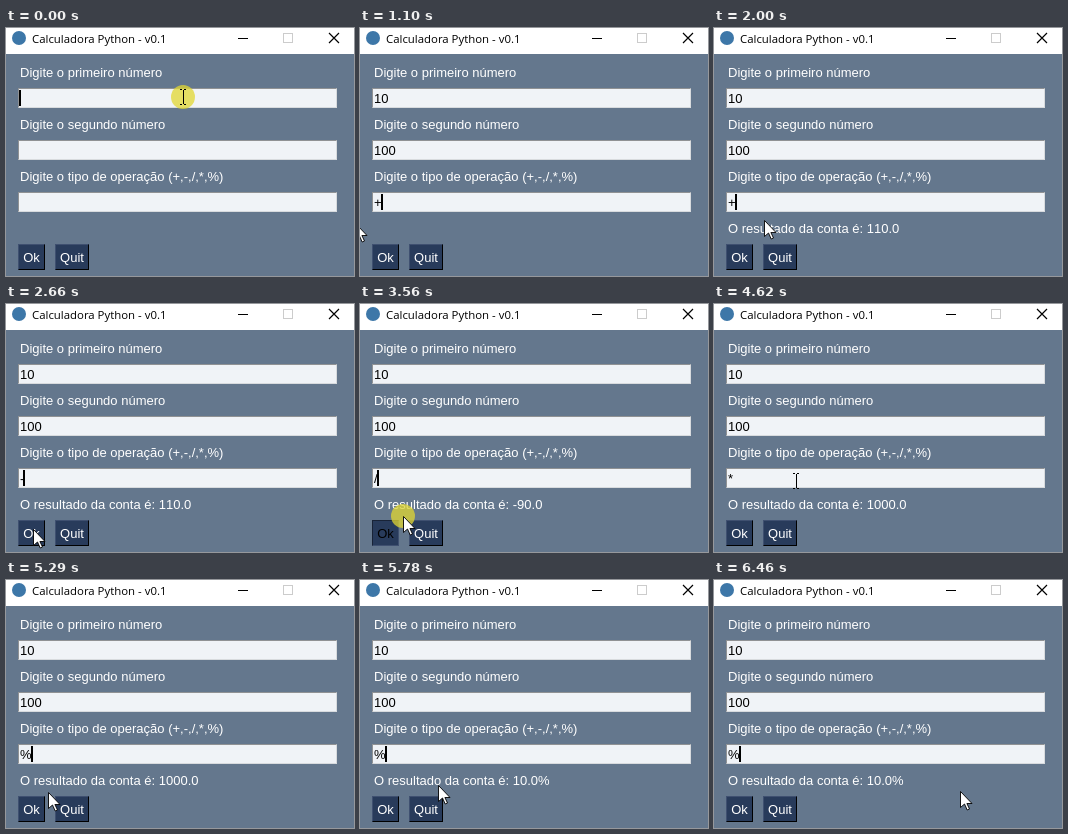
An HTML page for the animation above (6.48 s loop, 348 by 248 pixels).

```html
<!DOCTYPE html>
<html lang="pt">
<head>
<meta charset="utf-8">
<title>Calculadora Python</title>
<style>
  html, body { margin: 0; width: 100%; height: 100%; overflow: hidden; }
  body { position: relative; background: #64778d; }
  div, svg, .caret { position: absolute; box-sizing: border-box; }
  div { font: 13px/15px "Liberation Sans", Arial, sans-serif; font-kerning: none; white-space: pre; }
  .label { left: 14px; color: #fff; }
  .field {
    left: 12px; width: 319px; height: 20px; padding: 2px 1px; color: #000;
    background: #f0f3f7; border: 1px solid; border-color: #909294 #d8dbde #d8dbde #909294;
  }
  .caret { top: 1px; width: 2px; height: 16px; margin-left: -1px; background: #000; }
  .button {
    top: 216px; height: 26px; padding-top: 5px; text-align: center; color: #fff;
    background: #283b5b; border: 1px solid; border-color: #3f5070 #000 #000 #3f5070;
  }
  .button.down { color: #000; border-color: #182337 #3f5070 #3f5070 #182337; }
  svg { left: 0; top: 0; width: 348px; height: 248px; }
  svg text { font: 11.4px "Open Sans", "Noto Sans", sans-serif; }
  .crisp { shape-rendering: crispEdges; }
</style>
</head>
<body>
<div class="label" style="top:37px">Digite o primeiro número</div>
<div class="field" style="top:60px"><span></span><i class="caret"></i></div>
<div class="label" style="top:89px">Digite o segundo número</div>
<div class="field" style="top:112px"><span></span><i class="caret"></i></div>
<div class="label" style="top:141px">Digite o tipo de operação (+,-,/,*,%)</div>
<div class="field" style="top:164px"><span></span><i class="caret"></i></div>
<div class="label" id="result" style="top:193px"></div>
<div class="button" id="ok" style="left:12px; width:27px">Ok</div>
<div class="button" style="left:49px; width:34px">Quit</div>
<svg viewBox="0 0 348 248">
  <rect width="348" height="26" fill="#fff"/>
  <circle cx="13" cy="10" r="7" fill="#3d77a8"/>
  <text x="26" y="15">Calculadora Python - v0.1</text>
  <path class="crisp" d="M232 10.5h10" stroke="#000"/>
  <rect class="crisp" x="277.5" y="5.5" width="9" height="9" fill="none" stroke="#ccc"/>
  <path d="M323 5l10 10m0-10l-10 10" stroke="#000" stroke-width="1.2"/>
  <g id="pointer">
    <circle id="halo" r="12" fill="#e1d732" fill-opacity=".75"/>
    <path id="arrow" d="M.5 .5V16.5L4.5 13L7.2 19L9.5 18L6.9 12.5H12Z" fill="#fff" stroke="#000" stroke-width=".9"/>
    <path id="beam" class="crisp" d="M-3 -7.5h2m2 0h2M.5 -7V7M-3 7.5h2m2 0h2" fill="none" stroke="#000"/>
  </g>
</svg>
<script>
const LOOP = 6480, TICK = 20, PRESS = 100, KEY = 60;
const $ = id => document.getElementById(id);
const fields = [...document.querySelectorAll('.field')];
const a = 10, b = 100;

// Each operator: when it is typed, when Ok is pressed, and what it gives
const operations = [
  { sign: '+', typed: 700, ok: 1500, result: a + b },
  { sign: '-', typed: 2460, ok: 2860, result: a - b },
  { sign: '/', typed: 3360, ok: 3560, result: a / b },
  { sign: '*', typed: 3880, ok: 3940, result: a * b },
  { sign: '%', typed: 4820, ok: 5490, result: a * b / 100, unit: '%' }
];

// Where the pointer arrives, and when
const OK = [27, 225], FIELD = [62, 174];
const stops = [
  [0, 177, 69], [1100, -5, 195], [1400, ...OK], [2140, ...FIELD], [2660, ...OK],
  [3160, ...FIELD], [3460, 39, 219], [3700, ...FIELD], [3940, ...OK],
  [4620, 82, 177], [5390, ...OK], [5780, 78, 205], [6460, 246, 211]
];

const typing = (value, start, t) =>
  String(value).slice(0, Math.max(0, Math.floor((t - start) / KEY) + 1));
const show = (el, on) => el.style.visibility = on ? 'visible' : 'hidden';

// Rest at each stop, then glide to the next one
function pointerAt(t) {
  const i = stops.findLastIndex(s => s[0] <= t);
  const [t0, x0, y0] = stops[i];
  const [t1, x1, y1] = stops[i + 1] || [LOOP, x0, y0];
  const travel = Math.min(400, .7 * (t1 - t0));
  const k = Math.max(0, 1 - (t1 - t) / travel);
  return [Math.round(x0 + (x1 - x0) * k), Math.round(y0 + (y1 - y0) * k)];
}

function draw(time) {
  const t = Math.floor(time / TICK) * TICK;
  const current = operations.findLast(o => o.typed <= t);
  const done = operations.findLast(o => o.ok + PRESS <= t);

  const texts = [typing(a, 200, t), typing(b, 400, t), current ? current.sign : ''];
  const active = t < 340 ? 0 : t < 600 ? 1 : 2;
  const caretOn = (t - (current ? current.typed : 0)) % 800 < 600;
  fields.forEach((field, i) => {
    field.firstChild.textContent = texts[i];
    show(field.lastChild, i === active && caretOn);
  });
  $('result').textContent = done
    ? `O resultado da conta é: ${done.result.toFixed(1)}${done.unit || ''}` : '';

  const [x, y] = pointerAt(t);
  const okDown = operations.some(o => t >= o.ok && t < o.ok + PRESS);
  const overField = x >= 12 && x < 331 &&
    fields.some(f => y >= f.offsetTop && y < f.offsetTop + f.offsetHeight);
  $('pointer').setAttribute('transform', `translate(${x} ${y})`);
  show($('halo'), okDown || t < PRESS);
  show($('arrow'), !overField);
  show($('beam'), overField);
  $('ok').classList.toggle('down', okDown);
}

const began = performance.now();
function frame() {
  draw((performance.now() - began) % LOOP);
  requestAnimationFrame(frame);
}
draw(0);
requestAnimationFrame(frame);
</script>
</body>
</html>
```
